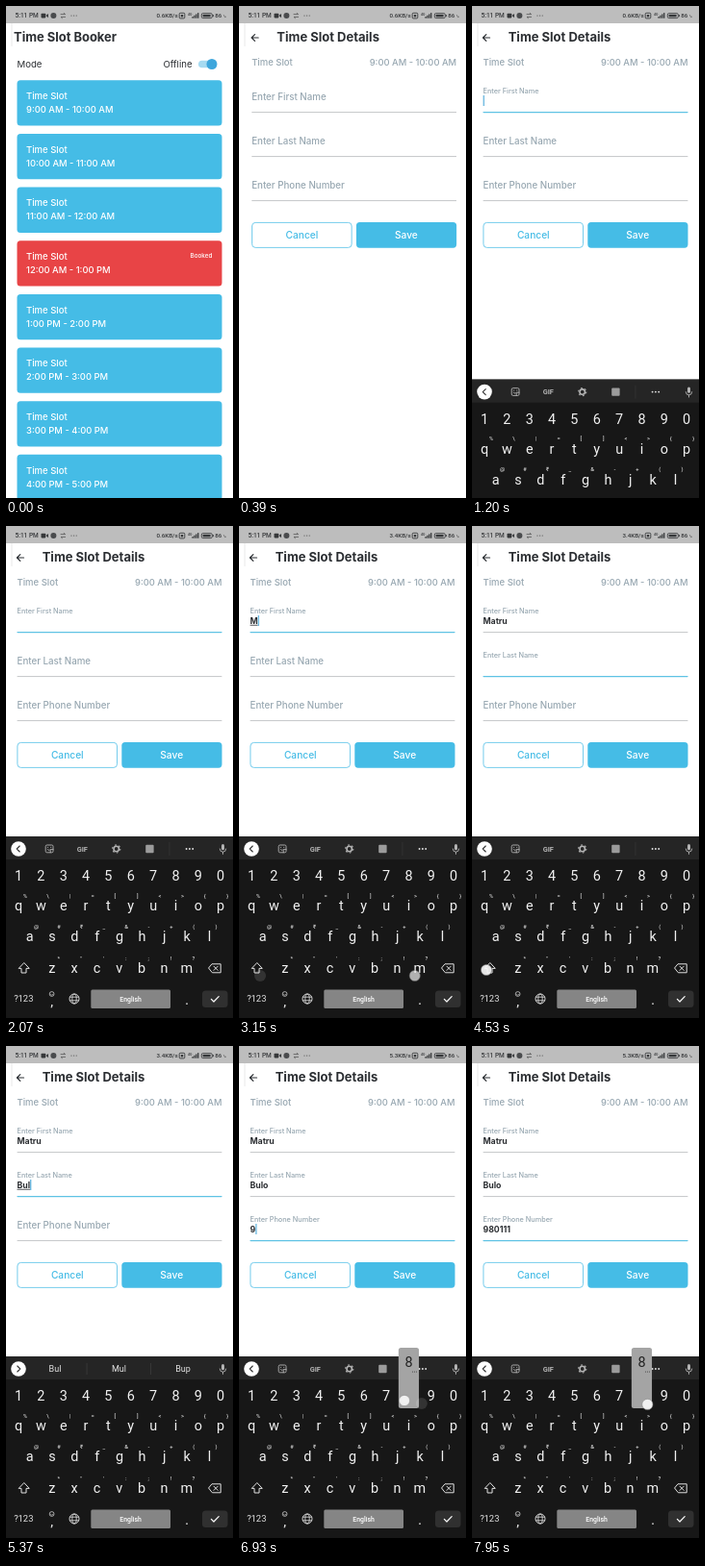
Animation of 236x512 px, one loop 8000 ms. Source, as an HTML page:

```html
<!DOCTYPE html>
<html lang="en">
<head>
<meta charset="utf-8">
<title>Time Slot Booker</title>
<style>
html, body { margin: 0; width: 236px; height: 512px; overflow: hidden; background: #fff; }
svg { display: block; font-family: Inter, sans-serif; }
.kb { font-family: Roboto, sans-serif; }
</style>
</head>
<body>
<svg id="stage" width="236" height="512" viewBox="0 0 236 512"></svg>
<script>
const LOOP = 8000, BLUE = '#45bce6', SLATE = '#97a7b1', INK = '#2b2e32', PALE = '#e2e2e2', DIM = '#b4b4b4';
const svg = document.getElementById('stage');

function add(parent, tag, attrs = {}, text) {
  const n = document.createElementNS('http://www.w3.org/2000/svg', tag);
  for (const k in attrs) n.setAttribute(k, attrs[k]);
  if (text !== undefined) n.textContent = text;
  parent.appendChild(n);
  return n;
}
const set = (n, attrs) => { for (const k in attrs) n.setAttribute(k, attrs[k]); };
const show = (n, on) => n.setAttribute('display', on ? 'inline' : 'none');
const group = (p, attrs) => add(p, 'g', attrs);
const rect = (p, x, y, width, height, fill, more) => add(p, 'rect', { x, y, width, height, fill, ...more });
const dot = (p, cx, cy, r, fill, more) => add(p, 'circle', { cx, cy, r, fill, ...more });
const line = (p, d, stroke, w = 1, more) => add(p, 'path', {
  d, stroke, fill: 'none', 'stroke-width': w, 'stroke-linecap': 'round', 'stroke-linejoin': 'round', ...more });
const label = (p, x, y, s, size, fill, weight = 400, anchor = 'start') => add(p, 'text', {
  x, y, fill, 'font-size': size, 'font-weight': weight, 'text-anchor': anchor }, s);
const clamp = v => Math.min(1, Math.max(0, v));
const easeOut = u => 1 - (1 - clamp(u)) ** 3;
const easeInOut = u => (u = clamp(u)) * u * (3 - 2 * u);

// ---- list page
const list = group(svg);
rect(list, 0, 0, 236, 512, '#fff');
label(list, 8, 37.3, 'Time Slot Booker', 12.95, INK, 700);
label(list, 11.5, 64, 'Mode', 9.6, INK);
label(list, 193.5, 64, 'Offline', 9.6, INK, 400, 'end');
rect(list, 200, 56.7, 18.5, 7.6, '#a6daf1', { rx: 3.8 });
dot(list, 214, 60.5, 5.5, '#3ea6dc');
const hours = ['9:00 AM - 10:00 AM', '10:00 AM - 11:00 AM', '11:00 AM - 12:00 AM', '12:00 AM - 1:00 PM',
  '1:00 PM - 2:00 PM', '2:00 PM - 3:00 PM', '3:00 PM - 4:00 PM', '4:00 PM - 5:00 PM'];
hours.forEach((h, i) => {
  const y = 77.3 + i * 55.65, booked = i === 3;
  rect(list, 11.5, y, 213, 47.3, booked ? '#e84446' : BLUE, { rx: 3.5 });
  label(list, 21, y + 19.8, 'Time Slot', 9.5, '#fff', 500);
  label(list, 21, y + 33.8, h, 9.4, '#fff', 500);
  if (booked) label(list, 214.5, y + 18.2, 'Booked', 6.4, '#fff', 500, 'end');
});

// ---- details page
const page = group(svg);
rect(page, 0, 18, 236, 494, '#fff');
line(page, 'M18.5 33H11.5M14.8 29.6L11.4 33L14.8 36.4', INK, 1.2);
label(page, 37.7, 37.3, 'Time Slot Details', 13, INK, 700);
label(page, 11.5, 62.4, 'Time Slot', 9.5, SLATE, 500);
label(page, 224.5, 62.4, hours[0], 9.4, SLATE, 500, 'end');
rect(page, 11.9, 225.4, 103.6, 26, '#fff', { rx: 3.6, stroke: '#66c7ea', 'stroke-width': 0.9 });
rect(page, 120.3, 225, 104.2, 26.7, BLUE, { rx: 3.6 });
label(page, 63.8, 242.2, 'Cancel', 10.2, BLUE, 500, 'middle');
label(page, 172.2, 242.2, 'Save', 10.2, '#fff', 500, 'middle');

const fields = [['Enter First Name', 1000, 4000], ['Enter Last Name', 3990, 6060], ['Enter Phone Number', 6060, 9000]]
  .map(([name, from, to], i) => {
    const y = 110.6 + i * 46;
    return {
      from, to, y,
      rule: line(page, `M12 ${y}H224`, '#c4c6c8', 1),
      name: label(page, 0, 0, name, 9.75, SLATE, 500),
      value: label(page, 11.5, y - 9, '', 8.7, INK, 700),
      under: rect(page, 11.5, y - 7.8, 0, 0.8, INK)
    };
  });
const caret = rect(page, 0, 0, 1.2, 11, '#5ab0dc');
const caretOff = [[1920, 2420], [4480, 4720], [6540, 6760], [7920, LOOP]];

// ---- status bar
rect(svg, 0, 0, 236, 18, '#bdbdbd');
rect(svg, 5.6, 18, 0.8, 24, '#e3e3e3');
const bar = group(svg, { class: 'kb' });
label(bar, 9.5, 12.2, '5:11 PM', 6.5, '#36383a', 500);
rect(bar, 36.5, 7.8, 4.8, 4.6, '#36383a', { rx: 0.8 });
add(bar, 'path', { d: 'M41.5 10L44 8V12.2Z', fill: '#36383a' });
dot(bar, 49.4, 10.1, 3, '#4a4c4e');
line(bar, 'M57 8.6h4.6l-1.4-1.2M61.6 11.4H57l1.4 1.2', '#555', 0.8);
for (const x of [68, 70.6, 73.2]) dot(bar, x, 10, 0.6, '#444');
const speed = label(bar, 156.5, 12.2, '', 6.2, '#36383a', 500);
rect(bar, 180.2, 7.3, 5.6, 5.6, 'none', { stroke: '#36383a', 'stroke-width': 0.9, rx: 1 });
rect(bar, 181.8, 9, 2.4, 2.4, '#36383a');
label(bar, 189, 9.6, '4G', 3.6, '#36383a', 500);
for (let i = 0; i < 4; i++) rect(bar, 193.4 + i * 1.9, 11 - i * 1.3, 1.3, 1.7 + i * 1.3, '#36383a');
rect(bar, 203.3, 7.6, 11, 5, 'none', { stroke: '#36383a', 'stroke-width': 0.8, rx: 1.4 });
rect(bar, 204.6, 8.8, 8, 2.6, '#36383a');
rect(bar, 214.9, 9, 0.9, 2.2, '#36383a');
label(bar, 217.2, 12.2, '86', 6.2, '#36383a', 500);
line(bar, 'M226.6 9.6l1 2l1-.4', '#555', 0.7);

// ---- keyboard
const kb = group(svg, { class: 'kb' });
rect(kb, 0, 323, 236, 189, '#171717');
rect(kb, 0, 323, 236, 24, '#252525');
dot(kb, 13, 336, 7.8, '#fff');
const chevron = line(kb, '', '#333', 1.1);
rect(kb, 224, 331, 3, 6.2, DIM, { rx: 1.5 });
line(kb, 'M222.3 336a3.2 3.2 0 0 0 6.4 0M225.5 339.4v2', DIM, 0.9);

const tools = group(kb);
rect(tools, 41.2, 332, 7.8, 7.8, 'none', { rx: 1.4, stroke: DIM, 'stroke-width': 0.9 });
line(tools, 'M49 336.6h-2.8v3.2M43.2 336.6q1 1.6 2.2 .6M43.4 334.4h.2M46.6 334.4h.2', DIM, 0.9);
label(tools, 79.3, 338.6, 'GIF', 7.4, DIM, 700, 'middle');
dot(tools, 114.7, 336, 2.7, 'none', { stroke: DIM, 'stroke-width': 1.6 });
dot(tools, 114.7, 336, 4.1, 'none', { stroke: DIM, 'stroke-width': 1.1, 'stroke-dasharray': '1.7 2.6' });
rect(tools, 145.2, 331.8, 8.4, 8.4, '#9c9c9c', { rx: 1 });
rect(tools, 169.6, 329, 0.7, 14, '#383838');
for (const x of [187.6, 190.9, 194.2]) dot(tools, x, 336, 0.95, PALE);

const sug = group(kb);
for (const x of [83.7, 150.2]) rect(sug, x, 330, 0.7, 12, '#404040');
const picks = [51, 117.5, 184].map(x => label(sug, x, 339.4, '', 9, PALE, 400, 'middle'));

const spot = {}, letters = [];
function row(keys, hints, x0, y) {
  [...keys].forEach((k, i) => {
    const x = x0 + i * 23.35;
    spot[k] = [x, y];
    const n = label(kb, x, y + 5, k, 14.4, '#f1f1f1', 400, 'middle');
    if (!hints) return;
    letters.push([n, k]);
    label(kb, x + 7, y - 8.2, hints[i], 5.8, '#d4d4d4', 500, 'middle');
  });
}
row('1234567890', '', 13, 364);
row('qwertyuiop', '%\\|=[]<>{}', 13, 395);
row('asdfghjkl', '@#₹_&-+()', 24.7, 427);
row('zxcvbnm', '*"\':;!?', 47.7, 460);
Object.assign(spot, { shift: [18.5, 460], first: [120, 98], last: [120, 146], phone: [120, 191] });
const shiftIcon = line(kb, 'M18.5 454.8L13.2 460.4H16V465H21V460.4H23.8Z', PALE, 1);
line(kb, 'M214.4 455.8H223.2V464.8H214.4L210.8 460.3ZM216 458.2l4.2 4.2M220.2 458.2l-4.2 4.2', PALE, 1);
label(kb, 18.3, 495.4, '?123', 9.4, PALE, 400, 'middle');
label(kb, 47.6, 498.5, ',', 13, PALE, 500, 'middle');
dot(kb, 47.6, 487, 2.4, 'none', { stroke: PALE, 'stroke-width': 0.7 });
line(kb, 'M46.5 487.6q1.1 1.4 2.2 0', PALE, 0.6);
dot(kb, 71, 492, 5, 'none', { stroke: PALE, 'stroke-width': 0.9 });
add(kb, 'ellipse', { cx: 71, cy: 492, rx: 2.2, ry: 5, fill: 'none', stroke: PALE, 'stroke-width': 0.8 });
line(kb, 'M66.5 490.2h9M66.5 493.8h9', PALE, 0.8);
rect(kb, 88.3, 482.5, 82.7, 19.5, '#858585', { rx: 1.5 });
label(kb, 129.6, 494.6, 'English', 6.9, '#fff', 500, 'middle');
label(kb, 188, 498, '.', 13, PALE, 500, 'middle');
rect(kb, 204, 483.5, 26.5, 17.5, '#303030', { rx: 3.5 });
line(kb, 'M213.4 492.4l2.6 2.6l5.2-5.4', '#fff', 1.2);

// ---- touches: key, down, up, finger offset, field typed into
const touches = [
  ['first', 990, 1040, 0, 0],
  ['shift', 2560, 2750, 3.5, 8],
  ['M', 3000, 3120, -5, 8, 0], ['a', 3330, 3430, -2, 5, 0], ['t', 3580, 3660, 2, 5, 0],
  ['r', 3710, 3790, 2, 5, 0], ['u', 3840, 3910, 1, 5, 0],
  ['last', 3960, 4010, 0, 0],
  ['shift', 4440, 4600, -3.5, 2],
  ['B', 4800, 4900, -3, 7, 1], ['u', 5010, 5100, 2, 5, 1], ['l', 5170, 5240, 0, 5, 1], ['o', 5640, 5740, -3, 5, 1],
  ['phone', 6030, 6080, 0, 0],
  ['9', 6720, 6830, -10, 8, 2], ['8', 6890, 7000, -4.5, 5, 2], ['0', 7070, 7160, -8, 6, 2],
  ['1', 7230, 7310, 2, 6, 2], ['1', 7390, 7470, 2, 6, 2], ['1', 7560, 7650, 2, 6, 2],
  ['8', 7920, 8100, 6, 9, 2]
].map(([key, down, up, dx, dy, field]) => {
  const [x, y] = spot[key] || spot[key.toLowerCase()];
  return { key, down, up, field, x, y, tx: x + dx, ty: y + dy };
});

const pop = group(svg, { class: 'kb' });
rect(pop, -10.6, -50, 21.2, 63, '#a4a4a4', { rx: 2.5 });
const popKey = label(pop, 0, -30.5, '', 14.4, '#222', 400, 'middle');
for (const x of [4, 6, 8]) dot(pop, x, -25, 0.5, '#333');
const ghost = dot(svg, 0, 0, 6, '#fff');
const finger = dot(svg, 0, 0, 5.6, '#f8f8f8', { stroke: '#8a8a8a', 'stroke-opacity': 0.5, 'stroke-width': 1 });

function drawFields(t) {
  let typed = '';
  let since = Infinity;
  fields.forEach((f, i) => {
    const done = touches.filter(k => k.field === i && k.up <= t);
    const text = done.map(k => k.key).join('');
    const u = easeInOut((t - f.from) / 180);
    const active = t >= f.from && t < f.to;
    set(f.name, { transform: `translate(11.5 ${f.y - 13 - 7 * u}) scale(${1 - 0.25 * u})` });
    set(f.rule, { stroke: active ? '#5fc3e4' : '#c4c6c8', 'stroke-width': active ? 1.3 : 1 });
    f.value.textContent = text;
    const w = text ? f.value.getComputedTextLength() : 0;
    const composing = active && i < 2 && text;
    set(f.under, { width: composing ? w : 0 });
    if (composing) {
      typed = text;
      since = done[0].up;
    }
    if (active) set(caret, { x: 11.6 + w, y: f.y - 17.6 });
  });
  show(caret, t >= fields[0].from && !caretOff.some(([a, b]) => t >= a && t < b));

  const suggest = typed && t > since + 110;
  show(sug, suggest);
  show(tools, !suggest);
  set(chevron, { d: suggest ? 'M11.8 333L14.8 336L11.8 339' : 'M14.2 333L11.2 336L14.2 339' });
  if (suggest) {
    const options = [typed, (typed[0] === 'M' ? 'B' : 'M') + typed.slice(1), typed.slice(0, 2) + 'p'];
    picks.forEach((p, i) => { p.textContent = options[i]; });
  }
}

function drawTouch(t) {
  const i = touches.findLastIndex(k => k.down <= t);
  const now = touches[i], prev = touches[i - 1];
  const held = now && t < now.up;
  const alpha = now ? 0.92 * (1 - clamp((t - now.up) / 120)) : 0;
  show(finger, alpha > 0);
  if (now) set(finger, { cx: now.tx, cy: now.ty, opacity: alpha });
  const trail = alpha > 0 && prev && now.down - prev.up <= 255;
  show(ghost, trail);
  if (trail) set(ghost, { cx: prev.tx, cy: prev.ty, opacity: 0.12 });
  const popped = held && now.key.length === 1;
  show(pop, popped);
  if (popped) {
    set(pop, { transform: `translate(${now.x} ${now.y})` });
    popKey.textContent = now.key;
  }
  // Shift stays on until the next key is released.
  const last = touches.filter(k => k.up <= t).pop();
  const caps = !!last && last.key === 'shift';
  for (const [n, k] of letters) n.textContent = caps ? k.toUpperCase() : k;
  set(shiftIcon, { fill: caps ? PALE : 'none' });
}

function draw(t) {
  set(page, { transform: `translate(${236 * (1 - easeOut((t - 15) / 465))} 0)` });
  set(kb, { transform: `translate(0 ${189 * (1 - easeOut((t - 1097) / 350))})` });
  speed.textContent = (t < 2400 ? '0.6' : t < 6045 ? '3.4' : '5.3') + 'KB/s';
  drawFields(t);
  drawTouch(t);
}

const start = performance.now();
function tick() {
  draw((performance.now() - start) % LOOP);
  requestAnimationFrame(tick);
}
draw(0);
requestAnimationFrame(tick);
</script>
</body>
</html>
```
